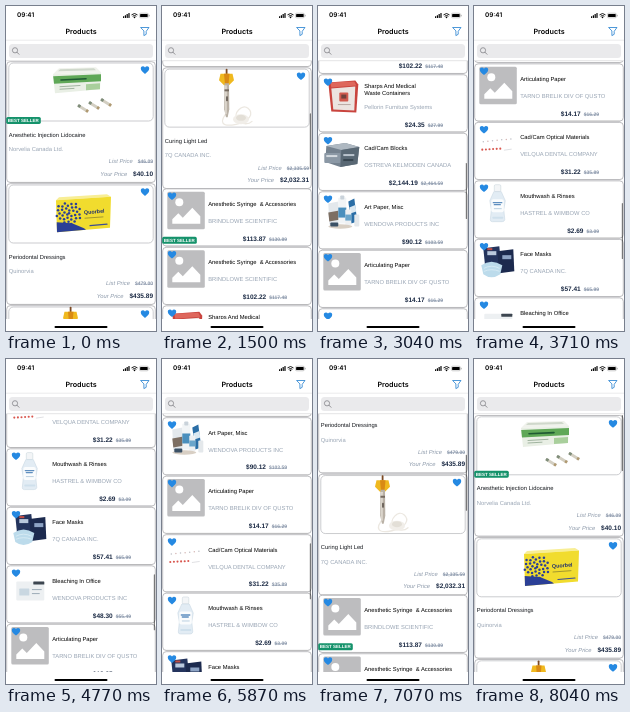
Recreate the animation shown at these times as an HTML page. Size 150 by 325 pixels, loop 8070 ms.

```html
<!DOCTYPE html>
<html lang="en">
<head>
<meta charset="utf-8">
<title>Products</title>
<style>
  html, body { margin: 0; width: 100%; height: 100%; overflow: hidden; background: #fff; }
  svg { display: block; width: 100vw; height: 100vh; }
  text { font: 5.8px "Liberation Sans", Arial, sans-serif; text-rendering: geometricPrecision; white-space: pre; }
  .bar { font: 600 6.4px Inter, sans-serif; }
  .heading { font: 600 7.2px Inter, sans-serif; }
  .maker { fill: #99a5b4; }
  .label { fill: #8b98a9; font-style: italic; }
  .price { fill: #1c2b45; font-size: 6.5px; font-weight: bold; font-style: normal; }
  .old { fill: #8794a8; font-size: 5px; font-weight: bold; font-style: normal; text-decoration: line-through; }
  .badge { fill: #fff; font-size: 4.5px; font-weight: bold; }
  .brand { fill: #24336c; font-size: 5.4px; font-weight: bold; }
</style>
</head>
<body>
<svg id="stage" viewBox="0 0 150 325"></svg>
<script>
const LOOP = 8070, LIST_TOP = 55, LIST_BOTTOM = 313;
const LARGE = 122, SMALL = 58.5, FIRST = 56;

// [time in ms, scroll offset]
const scrollKeys = [[0, .8], [20, .8], [1500, 238.5], [2330, 376.5], [2470, 383], [2570, 383],
  [3710, 656], [4700, 742], [5870, 597], [7070, 185.5], [8040, 0], [8070, 0]];

const rect = (x, y, w, h, fill, r = 0, more = '') =>
  `<rect x="${x}" y="${y}" width="${w}" height="${h}" rx="${r}" fill="${fill}" ${more}/>`;
const path = (d, fill, more = '') => `<path d="${d}" fill="${fill}" ${more}/>`;
const line = (d, color, width) =>
  path(d, 'none', `stroke="${color}" stroke-width="${width}" stroke-linecap="round" stroke-linejoin="round"`);
const disc = (x, y, r, fill) => `<circle cx="${x}" cy="${y}" r="${r}" fill="${fill}"/>`;
const oval = (x, y, rx, ry, fill) => `<ellipse cx="${x}" cy="${y}" rx="${rx}" ry="${ry}" fill="${fill}"/>`;
const escape = s => s.replace(/&/g, '&amp;');
const text = (x, y, s, more = '') => `<text x="${x}" y="${y}" ${more}>${escape(s)}</text>`;
const move = (x, y, body) => `<g transform="translate(${x} ${y})">${body}</g>`;
const repeat = (n, f) => Array.from({ length: n }, (_, i) => f(i)).join('');

const heart = (x, y) => move(x, y,
  path('M0 3.9C-2.3 2.1-4.2.5-4.2-1.4C-4.2-4-1.2-4.4 0-2.5C1.2-4.4 4.2-4 4.2-1.4C4.2.5 2.3 2.1 0 3.9Z', '#2589e2'));
const badge = y => rect(.2, y - 3.5, 34.6, 7, '#15926b', 1.6) + text(1.8, y + 1.6, 'BEST SELLER', 'class="badge"');
const frame = h => rect(.7, .5, 148.6, h - 1.3, '#fff', 3.5, 'stroke="#a2a3a6" stroke-width=".7"')
  + line(`M4 ${h - .7}H146`, '#b5b5b8', .6);

// Pictures in large cards, relative to the card's top left
const cartridge = (x, y) => `<g transform="translate(${x} ${y}) rotate(32)">`
  + rect(0, -1.4, 12, 2.9, '#d3cfc2', .8) + rect(0, -1.4, 3, 2.9, '#7f8d7a', .6)
  + rect(9.5, -1.4, 2.5, 2.9, '#b09a72', .6) + '</g>';
const anesthetic = () => path('M47 13L53 7L90 6L95 11Z', '#f0f2ec') + path('M54 8L88 7L90 9L52 10Z', '#cfd8cb')
  + path('M47 13L95 11L94 28L49 32Z', '#e9efe5')
  + path('M47.200 15L95 13V20L48 22.500Z', '#5fa857') + line('M55 18.800L80 17.600', '#1f5a33', 1.6)
  + line('M54 25.500L74 24.300M54 28L68 27.200', '#8ea58f', .8) + path('M80 23L94 22V28L80 29Z', '#a9cf9c')
  + cartridge(72, 44) + cartridge(83, 41) + cartridge(95, 38);
const dressing = () => path('M50 17L53 14L101 11L105 13.500Z', '#f8ee95')
  + path('M50 17L105 13.500L104 44.500L51 49Z', '#f1dc2e')
  + path('M50.700 39L66 40L78 45L80 46.600L51 49Z', '#2b3f96')
  + repeat(34, i => {
    const angle = i * 2.4, r = 2.3 * Math.sqrt(i);
    return disc(63 + r * Math.cos(angle), 30 + r * .85 * Math.sin(angle), 1.25, '#2b3f96');
  })
  + text(0, 0, 'Quorbel', 'transform="translate(78 31) rotate(-4)" class="brand"')
  + line('M79 35L97 33.700', '#6e692e', .6) + line('M84 42.500L101 41', '#3c4d95', 1.2);
const curingLight = () => line('M66 44C56 55 60 60 74 57S92 46 86 41S71 46 75 52S87 57 90 54', '#ece8e1', 1.3)
  + oval(79, 52, 8, 5, '#f1eee9') + oval(79, 50.5, 5, 3, '#e3dfd7')
  + rect(63.7, 1.5, 1.8, 7, '#7c4a24', .8)
  + path('M58.500 6.500H70.500L72 13L67 18H62L57 13Z', '#f0b91f') + path('M62 6.500H67.500L66.500 17.500H63Z', '#d98a14')
  + path('M62.500 16H67L67.300 42L65.700 50H64L62.200 42Z', '#b9b1a6') + rect(63.3, 18, 1.3, 29, '#e9e4dc', .5)
  + rect(62.5, 22, 4.5, 2, '#756a60') + rect(64, 29, 2, 5, '#70675f', .8);

// Thumbnails, 38 units square
const placeholder = () => rect(0, 0, 37.5, 37.5, '#bdbdbf', 1.5) + disc(12, 10.5, 4, '#fff')
  + path('M5 32V27.500L11 21.500L15.500 26L25 16L33 24.500V32Z', '#fff');
const sharps = () => path('M5 5L32 3L35 7L33 35L8 34Z', '#c9443e') + path('M8 11L32 9L31 33L10 32Z', '#ece4e0')
  + path('M7 5L31 4L33 8L8 10Z', '#de675c') + rect(16, 15, 9, 9, '#d15a4e', 1) + rect(18, 17, 5, 4, '#71413c')
  + line('M15 27H27', '#b9a9a4', 1);
const blocks = () => path('M3 10L22 7L36 11L34 28L17 31L2 26Z', '#75828f') + path('M3 10L22 7L36 11L18 14Z', '#aeb8c1')
  + path('M18 14L36 11L34 28L17 31Z', '#596874') + rect(1, 17, 16, 10, '#8b98a5', 1)
  + rect(3, 19, 11, 2, '#d4dae0') + rect(20, 18, 11, 2, '#b9c3cc') + rect(20, 23, 10, 2, '#37454f');
const artPaper = () => path('M5 9L15 7L17 28L6 30Z', '#e3e8ec') + path('M5 18L16 16L17 25L6 27Z', '#7d6f63')
  + rect(15, 3, 8, 26, '#f1f4f6', 1) + rect(15, 13, 8, 10, '#4a8fbd') + rect(17, 1, 4, 4, '#c9d2da', .8)
  + path('M25 7L31 4L34 27L28 29Z', '#2b6ea6') + path('M26 13L32 10.500L33 17L27 19Z', '#dbe8f1')
  + rect(22, 15, 6, 16, '#eef0f2', 1) + rect(22, 20, 6, 6, '#6aa5cb') + rect(31, 20, 5, 12, '#e4e8eb', 1)
  + oval(17, 32, 12, 2.2, '#d8cfc4') + rect(7, 28, 8, 4, '#3b5166', 1);
const optical = () => repeat(7, i => disc(4 + i * 4.6, 16.5 - i * .45, .75, i % 2 ? '#d5b6b4' : '#bdbec4'))
  + repeat(6, i => disc(3 + i * 3.6, 24.5 - i * .2, 1.05, '#d8564e')) + line('M25 25L32 24', '#d9d9dc', .8);
const mouthwash = () => rect(15, 1, 6.5, 7, '#f3f5f7', 1.3, 'stroke="#c5d0d9" stroke-width=".5"')
  + path('M14.500 8H22L26 17L24.500 26L25.500 36Q25 38 23 38H13Q11 38 11 36L12 26L10.500 17Z', '#e2ecf4', 'stroke="#c2d2df" stroke-width=".5"')
  + rect(12, 15.5, 12.5, 13, '#fafcfd', 2) + line('M14 19H22.500M15 21H21', '#5f8fc0', 1.3)
  + line('M15 25H22', '#a9c3da', .8) + rect(13, 33, 11, 2, '#cfe0ec', .8);
const masks = () => path('M4 6L20 4L22 24L6 26Z', '#24345d') + path('M18 9L34 7L35 29L20 31Z', '#1c2a4e')
  + rect(8, 9, 9, 4, '#b9c8dc') + rect(23, 13, 9, 4, '#8da3c4') + rect(8, 6, 5, 2, '#c24d45')
  + path('M2 23Q12 16 23 23L21 32Q12 38 4 32Z', '#bcdbeb') + line('M5 26Q12 22 20 26M5 29Q12 26 20 29', '#e0eff6', .7);
const bleaching = () => rect(5, 13, 28, 19, '#edf0f2', 1) + rect(22, 13, 11, 3, '#3d4650', .5)
  + rect(8, 20, 10, 7, '#c9d7e1', .6) + line('M21 21H30M21 25H28', '#9cabb7', 1);

const largeItems = [
  ['Anesthetic Injection Lidocaine', 'Norvelia Canada Ltd.', '$40.10', '$46.09', anesthetic, true],
  ['Periodontal Dressings', 'Quinorvia', '$435.89', '$479.00', dressing],
  ['Curing Light Led', '7Q CANADA INC.', '$2,032.31', '$2,335.59', curingLight]
];
const smallItems = [
  ['Anesthetic Syringe  & Accessories', 'BRINDLOWE SCIENTIFIC', '$113.87', '$130.89', placeholder, true],
  ['Anesthetic Syringe  & Accessories', 'BRINDLOWE SCIENTIFIC', '$102.22', '$117.48', placeholder],
  ['Sharps And Medical\nWaste Containers', 'Pellorin Furniture Systems', '$24.35', '$27.99', sharps],
  ['Cad/Cam Blocks', 'OSTREVA KELMODEN CANADA', '$2,144.19', '$2,464.59', blocks],
  ['Art Paper, Misc', 'WENDOVA PRODUCTS INC', '$90.12', '$103.59', artPaper],
  ['Articulating Paper', 'TARNO BRELIK DIV OF QUSTO', '$14.17', '$16.29', placeholder],
  ['Cad/Cam Optical Materials', 'VELQUA DENTAL COMPANY', '$31.22', '$35.89', optical],
  ['Mouthwash & Rinses', 'HASTREL & WIMBOW CO', '$2.69', '$3.09', mouthwash],
  ['Face Masks', '7Q CANADA INC.', '$57.41', '$65.99', masks],
  ['Bleaching In Office', 'WENDOVA PRODUCTS INC', '$48.30', '$55.49', bleaching],
  ['Articulating Paper', 'TARNO BRELIK DIV OF QUSTO', '$18.25', '$20.99', placeholder],
  ['Face Masks', '7Q CANADA INC.', '$34.78', '$39.99', masks]
];

const pricePair = (x, y, first, firstClass, second, secondClass, gap) =>
  `<text x="${x}" y="${y}" text-anchor="end"><tspan class="${firstClass}">${first}</tspan>`
  + `<tspan dx="${gap}" class="${secondClass}">${second}</tspan></text>`;

function largeCard([title, maker, price, old, picture, best]) {
  return frame(LARGE)
    + rect(2.8, 1.8, 144.4, 58, '#fff', 4.5, 'stroke="#b5b7bb" stroke-width=".7"')
    + picture() + heart(139, 8.8) + (best ? badge(59.2) : '')
    + text(2.8, 75.4, title, 'fill="#14171c"') + text(2.8, 89.8, maker, 'class="maker"')
    + pricePair(147, 102.3, 'List Price', 'label', old, 'old', 5)
    + pricePair(147, 114.6, 'Your Price', 'label', price, 'price', 6);
}

function smallCard([title, maker, price, old, picture, best]) {
  const lines = title.split('\n');
  const top = lines.length > 1 ? 14 : 17.5;
  return frame(SMALL) + move(5.3, 3.3, picture()) + heart(10, 7.8) + (best ? badge(52) : '')
    + lines.map((s, i) => text(46.2, top + i * 7.2, s)).join('')
    + text(46.2, 34.6, maker, 'class="maker"')
    + pricePair(125, 52.3, price, 'price', old, 'old', 3);
}

const statusBar = text(11, 11.3, '09:41', 'class="bar"')
  + repeat(4, i => rect(117 + i * 1.8, 10.3 - i * 1.1, 1.2, 1.6 + i * 1.1, '#000', .3))
  + line('M125.800 8.600Q128.500 6.200 131.200 8.600M126.900 10Q128.500 8.700 130.100 10', '#000', .9) + disc(128.5, 11.4, .8, '#000')
  + rect(133.4, 7.2, 9, 4.6, 'none', 1.3, 'stroke="#999" stroke-width=".5"')
  + rect(134.1, 7.9, 7.6, 3.2, '#000', .7) + rect(142.9, 8.7, .7, 1.7, '#999', .3);
const header = rect(0, 0, 150, LIST_TOP, '#fff') + statusBar
  + text(75, 27.6, 'Products', 'text-anchor="middle" class="heading"')
  + line('M135 21.500H143L140.200 25.300V28.300L137.900 29.600V25.300Z', '#237fd0', .8)
  + line('M0 34.200H150', '#d5d5d8', .5)
  + rect(3, 38, 144, 14, '#eaeaec', 3.5)
  + `<circle cx="9" cy="44.300" r="2.600" fill="none" stroke="#85858a" stroke-width=".8"/>` + line('M11 46.300L13 48.300', '#85858a', .9)
  + line('M0 54.700H150', '#c8c8cb', .5);

const smallStart = FIRST + LARGE * largeItems.length - 1;
document.getElementById('stage').innerHTML =
  `<clipPath id="view">${rect(0, LIST_TOP, 150, LIST_BOTTOM - LIST_TOP, '#000')}</clipPath>`
  + rect(0, 0, 150, 325, '#fff')
  + '<g clip-path="url(#view)"><g id="list">'
  + largeItems.map((item, i) => move(0, FIRST + i * LARGE, largeCard(item))).join('')
  + smallItems.map((item, i) => move(0, smallStart + i * SMALL, smallCard(item))).join('')
  + `</g>${rect(147.8, 0, 1.2, 56, '#000', .6, 'id="thumb" fill-opacity=".5"')}</g>`
  + header + rect(48.5, 320, 53, 1.9, '#000', .95);

const list = document.getElementById('list');
const thumb = document.getElementById('thumb');

// Monotone cubic interpolation: smooth, without overshoot
const slopes = scrollKeys.slice(1).map(([t, s], i) => (s - scrollKeys[i][1]) / (t - scrollKeys[i][0]));
const tangents = scrollKeys.map((_, i) => {
  const a = slopes[i - 1] || 0, b = slopes[i] || 0;
  return a * b > 0 ? 2 * a * b / (a + b) : 0;
});
function scrollAt(t) {
  const i = Math.max(0, scrollKeys.findIndex(key => key[0] > t) - 1);
  const [t0, s0] = scrollKeys[i], [t1, s1] = scrollKeys[i + 1];
  const h = t1 - t0, u = (t - t0) / h, v = 1 - u;
  return s0 * (1 + 2 * u) * v * v + tangents[i] * h * u * v * v
    + s1 * u * u * (3 - 2 * u) - tangents[i + 1] * h * u * u * v;
}

function render(t) {
  const scroll = scrollAt(t);
  list.setAttribute('transform', `translate(0 ${-scroll})`);
  thumb.setAttribute('y', LIST_TOP + 1 + scroll * .215);
  thumb.setAttribute('opacity', Math.min(1, Math.max(0, (t - 20) / 100)));
}

const start = performance.now();
function tick() {
  render((performance.now() - start) % LOOP);
  requestAnimationFrame(tick);
}
render(0);
requestAnimationFrame(tick);
</script>
</body>
</html>
```
